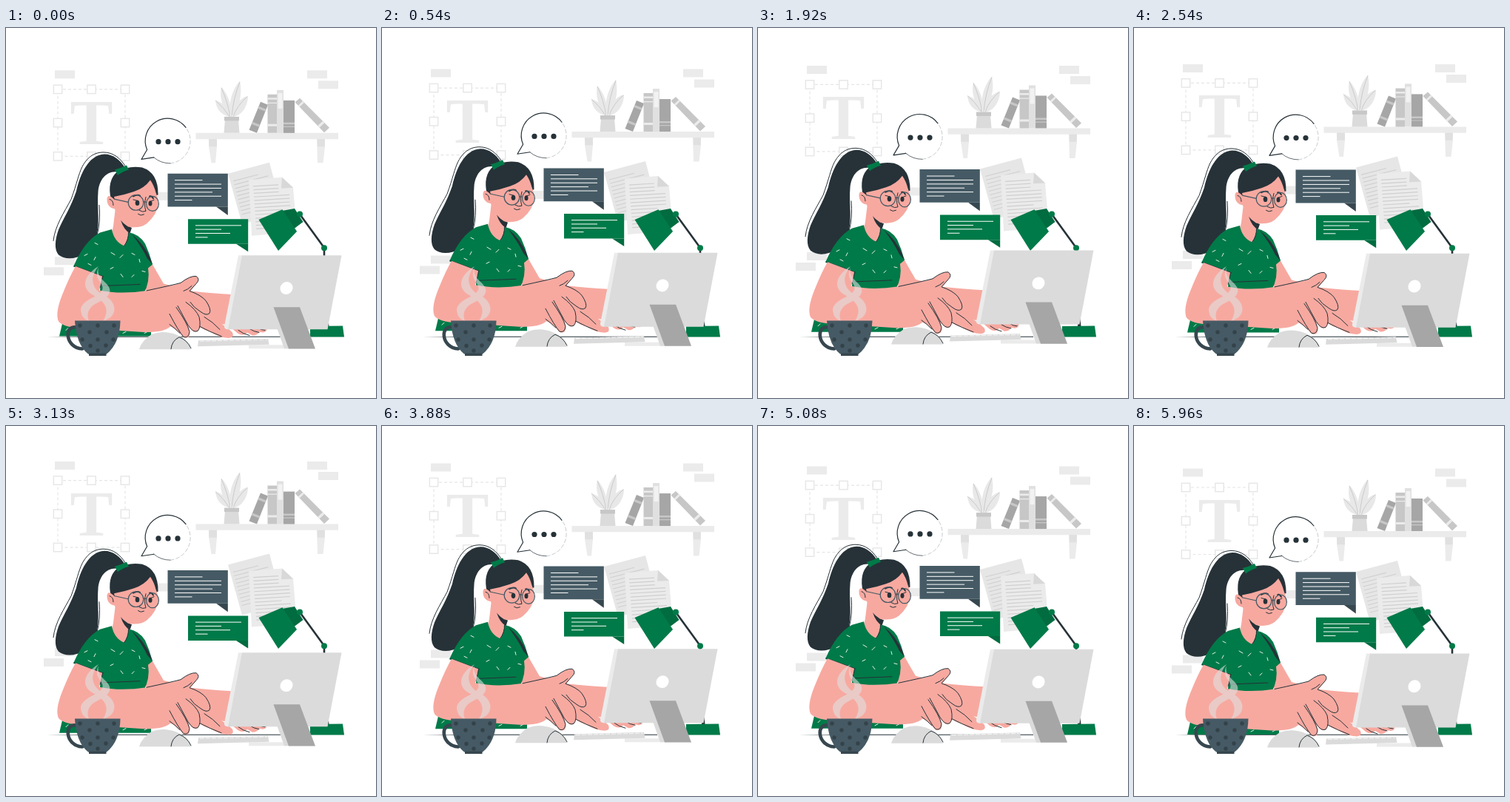
An HTML page for the animation above (6000 ms loop, 500x500 px).

```html
<!DOCTYPE html>
<html lang="en">
<head>
<meta charset="utf-8">
<title>Working at the desk</title>
<style>
html, body { margin: 0; width: 100%; height: 100%; overflow: hidden; background: #fff; }
svg { display: block; width: 100%; height: 100%; }
.line { fill: none; stroke: #263238; stroke-width: 1; stroke-linecap: round; stroke-linejoin: round; }
.ink { fill: #263238; }
.skin { fill: #f7a9a0; }
.green { fill: #007a48; }
.deep { fill: #006c40; }
.pale { fill: #ebebeb; }
.soft { fill: #dbdbdb; }
.mid { fill: #c7c7c7; }
.grey { fill: #a6a6a6; }
.text { fill: none; stroke: #fff; stroke-width: 1; }
</style>
</head>
<body>
<svg viewBox="0 0 500 500">
  <g id="wall">
    <path class="pale" d="M66 57.5h27v11h-27zM407 57.5h27v11h-27zM422 71.5h27v11h-27zM51 323.5h27v11h-27zM66 309.5h27v11h-27zM204 222h27v11h-27zM422 320h27v11h-27z"/>
    <rect x="70" y="83" width="91" height="90.5" fill="none" stroke="#e6e6e6" stroke-width="1.2" stroke-dasharray="4 3"/>
    <g id="handles" fill="#fff" stroke="#e6e6e6" stroke-width="1.4"></g>
    <text x="115.5" y="157" text-anchor="middle" font-family="'Liberation Serif', serif" font-weight="bold" font-size="87" fill="#ebebeb">T</text>

    <path class="pale" d="M256.5 142h192.500v8.300h-192.500zM274 150h11v10l-2 22.500h-5.500l-3.500-22.500zM420 150h11v10l-2.500 22.500h-7.500z"/>
    <path fill="#e0e0e0" d="M274 150.300h11v10h-10.500zM420.500 150.300h10.500l-.5 10h-9.500z"/>

    <g fill="#e8e8e8">
      <path d="M305 120C299 108 304 85 316 72C320 90 315 108 305 120z"/>
      <path d="M303 120C292 108 288 93 291 80C301 91 306 107 303 120z"/>
      <path d="M302 120C291 118 284 110 283 98C294 101 302 110 302 120z"/>
      <path d="M307 120C307 106 315 95 327 92C327 106 318 119 307 120z"/>
      <path fill="none" stroke="#bdbdbd" stroke-width=".7" d="M305 120Q307 95 316 73M303 120Q299 98 291 81M302 120Q295 108 283 98M307 120Q312 105 326 93"/>
    </g>
    <path class="soft" d="M296 124h18l1.500 18h-21z"/>
    <path class="mid" d="M295 120h20v5.500h-20z"/>

    <path class="grey" d="M344 100l10 4-15 38-10.500-4z"/>
    <path class="mid" d="M341.600 106l10 4-1.200 3-10-4zM333 127l10 4-1.200 3-10-4zM353.500 90h12.500v52h-12.500z"/>
    <path class="pale" d="M353.500 94.500h12.500v2.500h-12.500zM353.500 101h12.500v1.200h-12.500zM353.500 130h12.500v3h-12.500z"/>
    <path fill="#e0e0e0" d="M366 84h9v58h-9z"/>
    <path fill="#f2f2f2" d="M367.500 88h6v21h-6z"/>
    <path class="grey" d="M375 98h15v44h-15z"/>
    <path class="mid" d="M375 128h15v2.500h-15zM375 133h15v1.200h-15zM397 95l40 40-7 6.500-39.500-41z"/>
    <path class="pale" d="M401 99l2 2-6.500 6.200-2-2zM428 126l2.500 2.500-7 6.500-2.500-2.500z"/>

    <path fill="#e6e6e6" d="M300 197l56-15 18 68-55 15z"/>
    <path id="backLines" fill="none" stroke="#d0d0d0" stroke-width="1.1"/>
    <path class="pale" d="M328 205.500l45-3.500 15 14 5 60-61 5z"/>
    <path fill="#d8d8d8" d="M373 202l15 14-16 .8z"/>
    <path id="frontLines" fill="none" stroke="#cfcfcf" stroke-width="1.2"/>
  </g>

  <path class="ink" d="M55 417.300L120 416.800H372V417.700H120z"/>

  <g id="lamp">
    <path class="line" style="stroke-width:2.6" d="M398 253L430 297V340L434 394"/>
    <path class="ink" d="M433.300 385h1.200l2 18h-4.500z"/>
    <path class="green" d="M411 403l44-.5 2 15h-46z"/>
    <path class="deep" d="M373 247l17-3 11.500 18-12 9z"/>
    <path class="green" d="M341.500 259L373.500 245.300 393 275 368 301z"/>
    <circle class="green" cx="397" cy="251.500" r="4"/>
    <circle class="green" cx="430" cy="297.300" r="4"/>
  </g>

  <g id="girl">
    <!-- speech bubbles -->
    <path fill="#fff" d="M183 178L190.600 165A30.400 30.400 0 1 1 199.800 177z"/>
    <path class="line" style="stroke-width:1.2" d="M243 135A30.400 30.400 0 0 0 190.600 165L183 178 199.800 175.500"/>
    <path class="line" style="stroke-width:.7" d="M199.800 175.500Q209 183.500 222 183.500"/>
    <path class="line" style="stroke-width:.5;stroke-dasharray:5 3;opacity:.5" d="M222 183.500A30.400 30.400 0 0 0 243 135"/>
    <g class="ink"><circle cx="206" cy="154.200" r="3.600"/><circle cx="219" cy="154.200" r="3.600"/><circle cx="232" cy="154.200" r="3.600"/></g>
    <path fill="#455a64" d="M218.500 197.200h81.300v44.800h-81.300z"/>
    <path fill="#37474f" d="M284 242h15.800v11.500z"/>
    <path class="text" d="M228 206.200h37.500M228 211.600h63M228 217h63M228 222.400h51M228 227.800h63M228 233.200h23.500"/>
    <path class="green" d="M246 258.700h81.200v33.600h-81.200z"/>
    <path class="deep" d="M311 292.300h16.200v10.500z"/>
    <path class="text" d="M256 267.400h62M256 272.700h35M256 278h47M256 283.400h16.500"/>

    <!-- far arm and hand -->
    <path class="skin" d="M186 322L198 320Q206 334 213 346L250 356Q280 359 305 360.500L330 385 352 404Q354 411 347 412L342 411Q340 416 333 416L326 412Q321 418 313 413L300 402 262 396 190 362z"/>
    <path class="line" d="M314 409q6 5 15 7M329 407q6 4 13 5M341 406q4 3 9 3"/>

    <!-- ponytail -->
    <path class="ink" d="M151 195C136 193 126 205 124.500 222C123 240 126 256 124 273C122 290 117 299 106 306C94 313 79 314 71 307C65 300 66 287 71 273C78 257 88 242 95 221C100 199 111 172 133 171C145 171 154 179 160 188z"/>
    <path class="line" d="M64 288C66 268 79 249 88 232C96 210 98 198 103 188C111 173 121 168.500 132 168.500C145 168.500 155 177 161 187M126 240Q128 262 123 281"/>

    <!-- torso -->
    <path class="green" d="M76 400H196V417H72z"/>
    <path class="skin" d="M148 243L168 262 167 286 157 297 141 288 145 268z"/>
    <path class="ink" d="M155 260Q162 268 170 270.500L167.500 278Q159 273 155 260z"/>
    <path class="green" d="M143 272.500Q146 289 159.500 295Q165 287 165.500 276.500Q180 279 188 292Q194 305 198 320L192 325Q195 343 186 360L126 364 129 337 91 323Q106 288 127 277z"/>
    <path class="line" d="M165.500 276.500Q166 287 159.500 295M92 322L131 336M131 336L127 352M131 349l50-2"/>
    <path class="ink" d="M170 279Q187 293 195 312L198 320 191 312Q184 297 170 279z"/>
    <path id="flecks" fill="none" stroke="#fff" stroke-width=".9" stroke-linecap="round"/>

    <!-- near arm -->
    <path class="skin" d="M94 322.500L130 336 126 355Q155 361 190 355.500Q225 349 236 345Q249 335 257 336Q263 340 257 346L249 356Q263 362 269 368Q277 378 276 384Q272 391 264 385L260 383Q264 392 270 392Q292 397 306 412Q309 419 301 419.500Q288 419 276 411Q268 409 261 404Q262 412 254 411Q250 409 246 402Q250 413 247 418Q241 422 236 414Q226 404 222 404Q214 412 186 411.500L100 406Q78 405 71 397Q66 386 76 361Q86 336 94 322.500z"/>
    <path class="line" d="M190 355.500Q225 348 236 345Q249 335 257 336Q263 340 257 346L248 356Q263 361 270 369Q278 381 275 386Q271 390 263 384Q253 378 249 371"/>
    <path class="line" d="M243 371Q257 381 261 391Q264 405 259 410Q253 413 246 402L232 376M230 378Q245 399 248 411Q247 420 240 418Q233 410 221 387M221 401Q228 406 235 413M268 391Q280 398 289 408M262 404Q275 411 291 417"/>
    <path class="line" d="M251 349Q246 354 240 356"/>

    <!-- head -->
    <path class="ink" d="M142 233Q136 207 150 195Q165 186 184 189Q206 196 205.500 226L190 230 150 238z"/>
    <path class="skin" d="M147 233Q138 223 136.500 231Q136 243 147 245Q152 261 165 269Q180 272 190 265Q204 253 206 238Q205 229 202.500 223Q200 213 195 206Q187 217 173 221.500Q160 226 146 228.500z"/>
    <path class="line" d="M140 232Q145 233 145 240M189 229Q186 239 189 248Q185 250 180 247M178.500 252Q182 255 186.500 252.500"/>
    <path class="line" style="stroke-width:1.8" d="M172 228Q177 225 181 227M194 228Q197 227 199 231"/>
    <g class="ink"><ellipse cx="177.5" cy="237" rx="2.800" ry="3.600"/><ellipse cx="195" cy="237.500" rx="2.500" ry="3.500"/></g>
    <path class="line" d="M178 234l-6-1.500M195 235l5-2"/>
    <g class="line" style="stroke:#455a64;stroke-width:1.2"><circle cx="175.500" cy="236.500" r="10.300"/><ellipse cx="198" cy="238" rx="8.400" ry="10"/><path d="M165.200 236L147 232M185.800 236q2-1.500 3.800 0"/></g>
    <path class="green" d="M147 192Q155 190 163 186L166 192Q158 194 151 199.500z"/>
  </g>

  <g id="desk">
    <path class="pale" d="M314 307.500H320L301 407.500H299.500Q294.500 407 295 403z"/>
    <path class="soft" d="M319 307.500H453.500L434.500 407.500H300z"/>
    <ellipse cx="379" cy="351.800" rx="8.800" ry="8.200" fill="#fff" transform="rotate(-40 379 351.800)"/>
    <path class="pale" d="M328 428.500H380V433.500H328z"/>
    <path class="soft" d="M356 377.500H364L384 433.500H376z"/>
    <path class="grey" d="M361.500 377.500H397L418 433.700H382z"/>
    <path class="soft" d="M260 422.500L354 420 355.500 428 259 430.500z"/>
    <path fill="none" stroke="#f2f2f2" stroke-width="1.2" stroke-dasharray="6 2" d="M262 423.500L353 421.200"/>
    <path class="soft" d="M180 434.500Q183 423 197 414Q213 408 231 415Q246 421 250 434.500z"/>
    <path class="line" d="M223 434Q224 423 234 418Q245 422 250 433"/>
  </g>

  <g id="mug">
    <g fill="#e0e0e0" opacity=".6">
      <path d="M125 322C104 335 102 351 116 360C132 368 142 379 131 396C152 390 151 370 132 361C116 353 112 338 125 322z"/>
      <path d="M125 324C117 340 134 345 130 354C125 364 104 366 101 380C101 389 106 394 112 396C108 385 112 376 126 370C138 365 143 357 139 350C135 342 122 338 125 324z"/>
    </g>
    <path class="line" style="stroke:#37474f;stroke-width:4.600" d="M97 405C78 399 79 432 103 433.500"/>
    <path fill="#455a64" d="M93 395.500H154.500Q154 426 136 440.500H111Q95 428 93 395.500z"/>
    <path fill="#37474f" d="M112 439.500h23.500v3.500h-23.500z"/>
    <g id="dots" fill="#344249"></g>
  </g>
</svg>
<script>
const $ = id => document.getElementById(id);

$('handles').innerHTML = [70, 115.5, 161].map(x => [83, 128.2, 173.5].map(y =>
  x == 115.5 && y == 128.2 ? '' : `<rect x="${x - 5.7}" y="${y - 5.7}" width="11.4" height="11.4"/>`).join('')).join('');

$('dots').innerHTML = [[100, 402], [124, 402], [146, 402], [113, 411], [136, 411], [103, 421], [124, 421],
  [145, 421], [114, 429.5], [135, 429], [124, 436]].map(([x, y]) => `<circle cx="${x}" cy="${y}" r="2.7"/>`).join('');

// Stacked text lines: each row steps by (dx, dy) and runs along (w, rise).
const rows = (n, x, y, dx, dy, w, rise) => Array.from({ length: n }, (_, i) =>
  `M${x + i * dx} ${y + i * dy}l${w(i)} ${rise * w(i)}`).join('');
$('backLines').setAttribute('d', rows(10, 307, 207, 1.3, 5, i => i ? 46 : 34, -.26));
$('frontLines').setAttribute('d', rows(13, 334, 214, .35, 4.8, i => i < 3 ? 34 : i == 7 ? 36 : 48, -.06));

$('flecks').setAttribute('d', [[120, 291, 4, 2], [142, 304, 5, 3], [121, 310, -2, 4], [106, 308, 4, -2],
  [154, 311, 4, -4], [170, 305, 4, 2], [180, 313, 1, 4], [141, 326, 4, -2], [155, 333, 3, 4], [170, 337, 3, -3],
  [184, 329, 4, 1], [111, 319, 4, 2], [81, 409, 3, -3], [158, 413, 4, -2], [187, 413, 4, -2]
].map(([x, y, w, h]) => `M${x} ${y}l${w} ${h}`).join(''));

// Each layer floats up 10 units and back at a constant speed.
const periods = { wall: 6000, girl: 1500, desk: 3000 };
const lead = 40;
function draw() {
  const t = performance.now() + lead;
  for (const id in periods) {
    const phase = t % periods[id] / periods[id];
    $(id).setAttribute('transform', `translate(0 ${10 * Math.abs(1 - 2 * phase) - 10})`);
  }
  requestAnimationFrame(draw);
}
draw();
</script>
</body>
</html>
```
